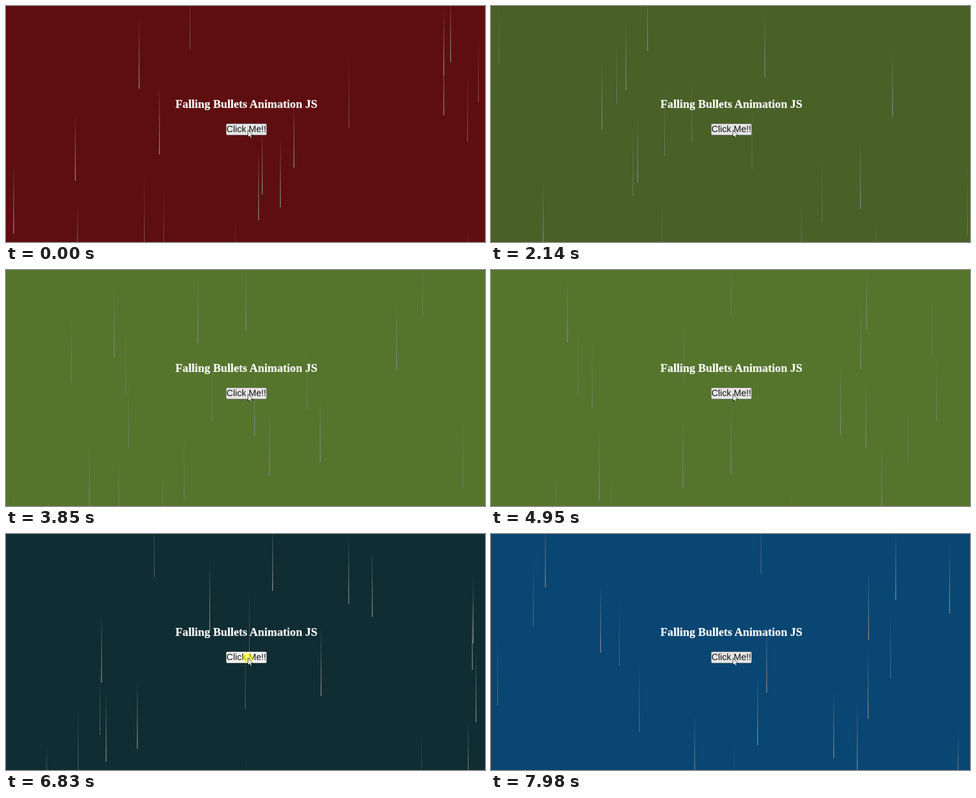
These frames come from a looping animation (1058 by 524 pixels, 8000 ms). An HTML page with a canvas:

```html
<!DOCTYPE html>
<html lang="en">
<head>
<meta charset="utf-8">
<title>Falling Bullets Animation JS</title>
<style>
  html, body { margin: 0; width: 100%; height: 100%; overflow: hidden; background: #5f0e10; }
  canvas, svg { position: absolute; left: 0; top: 0; display: block; }
  h1, .btn { position: absolute; margin: 0; text-align: center; white-space: nowrap; }
  h1 {
    left: 331px; top: 203px; width: 400px;
    font: bold 25.6px/30px "Liberation Serif", "Times New Roman", serif;
    color: #fff; -webkit-text-stroke: .3px #fff;
  }
  .btn {
    left: 486px; top: 261px; width: 90px; height: 26px; box-sizing: border-box;
    border: 1px solid #767676; border-radius: 3px; background: #e5e5e5;
    font: 20px/22px "Liberation Sans", Arial, sans-serif; color: #111;
  }
  .btn.down { background: #f5f5f5; }
</style>
</head>
<body>
<canvas id="rain" width="1058" height="524"></canvas>
<h1>Falling Bullets Animation JS</h1>
<div class="btn" id="btn">Click Me!!</div>
<svg width="1058" height="524">
  <circle id="press" cx="534" cy="275" r="11.5" fill="#ff0" fill-opacity=".6"/>
  <path d="M534.5 275.5v16l3.7-3.4 2.4 5.4 2.5-1.1-2.4-5.2h5z" fill="#fff" stroke="#000"/>
</svg>
<script>
const W = 1058, H = 524, LOOP = 8000;
const TICK = 78.1;                       // ms between redraws
const LENGTH = 157, START = 78;          // bullet height, lower end at birth
const SPEED = 0.2928, EVERY = 99.9;      // px per ms, ms between bullets
const LEAD = 61;                         // age of the newest bullet at time 0
const FIRST_CLICK = 210, CLICK_GAP = 1664, HOLD = 160;
const colors = ['#5f0e10', '#26716e', '#496027', '#55752d', '#0f2d32', '#094673'];

const ctx = document.getElementById('rain').getContext('2d');
const btn = document.getElementById('btn');
const press = document.getElementById('press');

// repeatable random number in 0..1
function random(n) {
  const v = Math.sin(n * 12.9898 + 4.1) * 43758.5453;
  return v - Math.floor(v);
}

function drawBullet(n, tip) {
  const x = Math.floor(random(n) * W);
  const width = random(n + 0.5) < 0.4 ? 1 : 2;
  const end = Math.round(tip), top = end - LENGTH;
  const fade = ctx.createLinearGradient(0, top, 0, end);
  fade.addColorStop(0, 'rgba(128,128,128,0)');
  fade.addColorStop(1, 'rgb(128,128,128)');
  ctx.fillStyle = fade;
  ctx.fillRect(x, top, width, LENGTH);
}

function draw(ms) {
  const clicks = Math.max(0, Math.floor((ms - FIRST_CLICK) / CLICK_GAP) + 1);
  ctx.fillStyle = colors[clicks];
  ctx.fillRect(0, 0, W, H);

  const newest = Math.floor((ms + LEAD) / EVERY);
  for (let n = newest; ; n--) {
    const tip = START + SPEED * (ms + LEAD - n * EVERY);
    if (tip - LENGTH > H) break;
    drawBullet(n, tip);
  }

  const down = FIRST_CLICK + clicks * CLICK_GAP - ms < HOLD;
  btn.classList.toggle('down', down);
  press.style.display = down ? '' : 'none';
}

const begin = performance.now();
function loop() {
  const t = (performance.now() - begin) % LOOP;
  draw(Math.floor(t / TICK) * TICK);
  requestAnimationFrame(loop);
}
loop();
</script>
</body>
</html>
```
